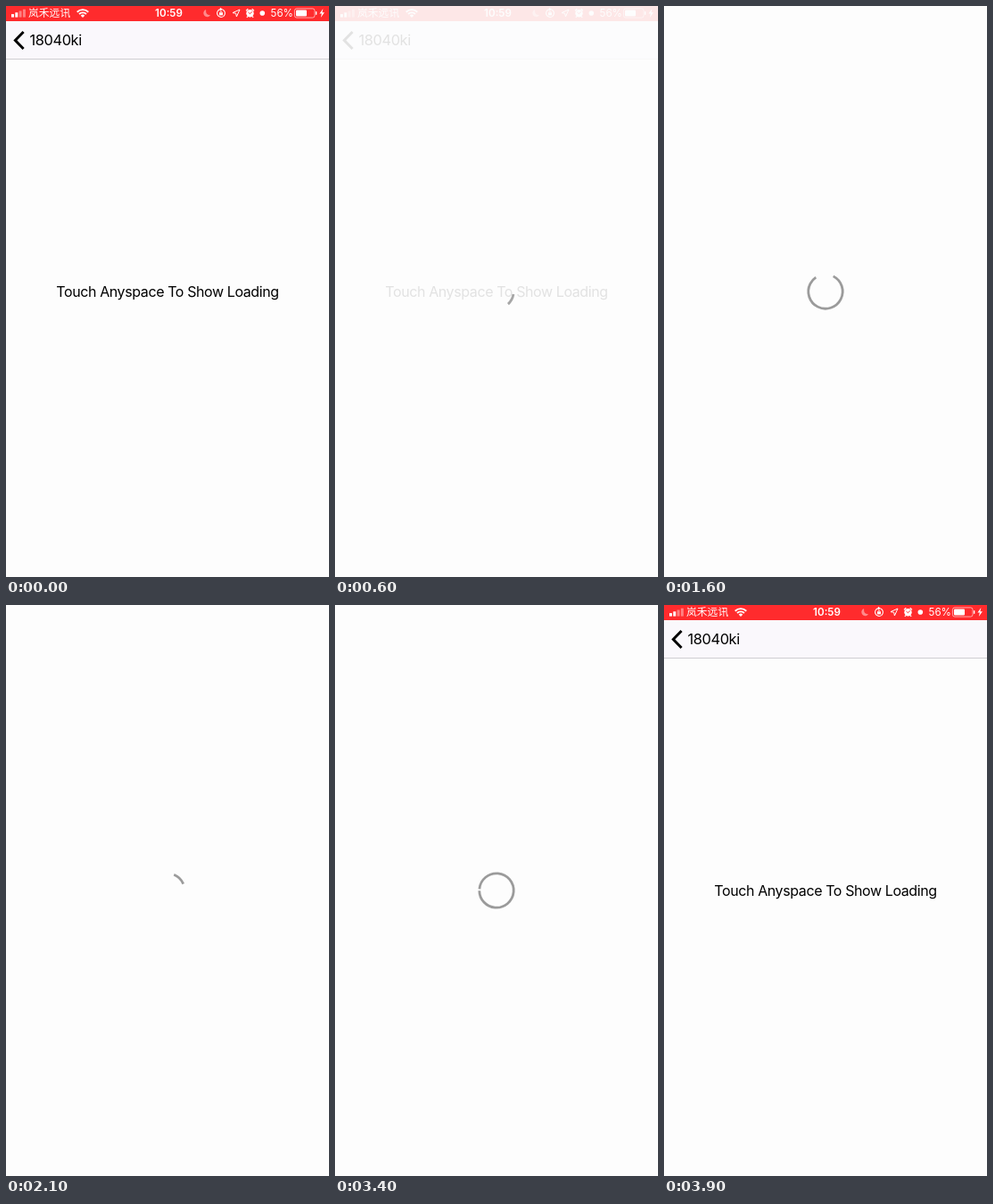
An HTML page with a canvas that plays this animation: 362x640 px, repeating every 4.3 s.

```html
<!DOCTYPE html>
<html lang="en">
<head>
<meta charset="utf-8">
<title>Loading</title>
<style>
html, body { margin: 0; width: 100%; height: 100%; overflow: hidden; background: #fdfdfd; }
canvas { display: block; }
</style>
</head>
<body>
<canvas id="stage" width="362" height="640"></canvas>
<script>
const W = 362, H = 640, LOOP = 4300, STEP = 100, CYCLE = 2000;
const BG = '#fdfdfd', TAU = Math.PI * 2;
const ctx = document.getElementById('stage').getContext('2d');
const clamp = x => Math.min(1, Math.max(0, x));
const smooth = x => x * x * (3 - 2 * x);

// Cubic timing curve through (0.4, 0) and (0.58, 0.9)
function ease(x) {
  x = clamp(x);
  let lo = 0, hi = 1;
  for (let i = 0; i < 24; i++) {
    const s = (lo + hi) / 2, r = 1 - s;
    if (1.2 * r * r * s + 1.74 * r * s * s + s * s * s < x) lo = s; else hi = s;
  }
  const s = (lo + hi) / 2;
  return 2.7 * (1 - s) * s * s + s * s * s;
}

function text(str, x, y, font, color, align = 'left', spacing = 0) {
  ctx.font = font;
  ctx.fillStyle = color;
  ctx.textAlign = align;
  ctx.letterSpacing = spacing + 'px';
  ctx.fillText(str, x, y);
}

function path(points, close) {
  ctx.beginPath();
  points.forEach(([x, y], i) => i ? ctx.lineTo(x, y) : ctx.moveTo(x, y));
  if (close) ctx.closePath();
}

function arc(x, y, r, from = 0, to = TAU) {
  ctx.beginPath();
  ctx.arc(x, y, r, from, to);
}

function signal() {
  for (let i = 0; i < 4; i++) {
    ctx.fillStyle = i < 2 ? '#fff' : 'rgba(255,255,255,.4)';
    const h = 3.5 + i * 1.8;
    ctx.fillRect(6 + i * 4.3, 12.6 - h, 3, h);
  }
}

function wifi() {
  const x = 86, y = 13, a = Math.PI * 0.25;
  ctx.lineWidth = 1.9;
  for (const r of [5.6, 8.9]) {
    arc(x, y, r, -Math.PI + a, -a);
    ctx.stroke();
  }
  ctx.beginPath();
  ctx.moveTo(x, y);
  ctx.arc(x, y, 3.2, -Math.PI + a, -a);
  ctx.fill();
}

function moon() {
  ctx.fillStyle = 'rgba(255,255,255,.45)';
  ctx.beginPath();
  ctx.arc(225.5, 8, 4.2, -1.9, 0.55, true);
  ctx.quadraticCurveTo(223.5, 10.5, 224.1, 4);
  ctx.fill();
  ctx.fillStyle = '#fff';
}

function rotationLock() {
  ctx.lineWidth = 1.1;
  arc(241, 8, 4.4, -1.2, 4.6);
  ctx.stroke();
  path([[239.9, 1.8], [243, 3.7], [239.9, 5.6]], true);
  ctx.fill();
  ctx.fillRect(239, 7.4, 4, 3);
  ctx.lineWidth = 0.8;
  arc(241, 7.4, 1.3, Math.PI, TAU);
  ctx.stroke();
}

function pointer() {
  ctx.lineWidth = 1;
  path([[262, 4], [258.4, 12], [257.7, 8.3], [254, 7.6]], true);
  ctx.stroke();
}

function alarm() {
  arc(273.5, 8.3, 4.2);
  ctx.fill();
  ctx.lineWidth = 1.3;
  path([[269, 5.4], [271.3, 3.2]]);
  ctx.stroke();
  path([[275.7, 3.2], [278, 5.4]]);
  ctx.stroke();
  path([[270.8, 11.6], [269.9, 12.8]]);
  ctx.stroke();
  path([[276.2, 11.6], [277.1, 12.8]]);
  ctx.stroke();
  ctx.strokeStyle = '#ff2b2d';
  ctx.lineWidth = 1;
  path([[271.5, 7], [273.5, 8.8], [275.7, 6.4]]);
  ctx.stroke();
  ctx.strokeStyle = '#fff';
}

function battery() {
  ctx.lineWidth = 0.8;
  ctx.strokeStyle = 'rgba(255,255,255,.75)';
  ctx.beginPath();
  ctx.roundRect(323.4, 2.9, 22.6, 10.2, 2.4);
  ctx.stroke();
  ctx.beginPath();
  ctx.roundRect(325, 4.4, 12, 7.2, 1);
  ctx.fill();
  ctx.fillRect(347, 6.2, 1.3, 3.6);
  path([[355.4, 3], [351.4, 8.6], [353.9, 8.6], [352.8, 13], [356.9, 7.2], [354.4, 7.2]], true);
  ctx.fill();
}

function statusBar() {
  ctx.fillStyle = '#ff2b2d';
  ctx.fillRect(0, 0, W, 17);
  signal();
  ctx.fillStyle = ctx.strokeStyle = '#fff';
  wifi();
  text('岚禾远讯', 25, 12.3, '11.8px "Noto Sans CJK SC", "Noto Sans CJK", sans-serif', '#fff');
  text('10:59', 182.5, 12.1, '600 11.6px Inter, sans-serif', '#fff', 'center');
  text('56%', 296.5, 12.1, '11.6px Inter, sans-serif', '#fff');
  moon();
  rotationLock();
  pointer();
  alarm();
  arc(287.3, 8, 2.8);
  ctx.fill();
  battery();
}

function navBar() {
  ctx.fillStyle = '#faf8fc';
  ctx.fillRect(0, 17, W, 42);
  ctx.fillStyle = '#cfced2';
  ctx.fillRect(0, 59, W, 1);
  ctx.strokeStyle = '#000';
  ctx.lineWidth = 3;
  path([[19.6, 29], [10.4, 38.5], [19.6, 48]]);
  ctx.stroke();
  text('18040ki', 26.5, 44.4, '16.4px Inter, sans-serif', '#000', 'left', -0.4);
}

function page() {
  ctx.fillStyle = BG;
  ctx.fillRect(0, 0, W, H);
  statusBar();
  navBar();
  text('Touch Anyspace To Show Loading', 181, 326, '16px Inter, sans-serif', '#000', 'center', -0.4);
}

function spinner(t) {
  const x = ((t + 1630) / CYCLE) % 1;
  const turn = ease(x), head = ease((x - 0.47) / 0.5), tail = ease(x / 0.5);
  if (tail - head < 0.001) return;
  ctx.strokeStyle = '#9b9b9b';
  ctx.lineWidth = 2.8;
  arc(181, 320, 19.2, (turn + head) * TAU, (turn + tail) * TAU);
  ctx.stroke();
}

function draw(t) {
  page();
  const cover = t < 400 ? 0 : smooth(clamp((t - 280) / 400)) - smooth(clamp((t - 3520) / 380));
  if (cover <= 0) return;
  ctx.globalAlpha = cover;
  ctx.fillStyle = BG;
  ctx.fillRect(0, 0, W, H);
  spinner(t);
  ctx.globalAlpha = 1;
}

const start = performance.now();
function tick() {
  const t = (performance.now() - start) % LOOP;
  draw(Math.floor(t / STEP) * STEP);
  requestAnimationFrame(tick);
}
tick();
</script>
</body>
</html>
```
